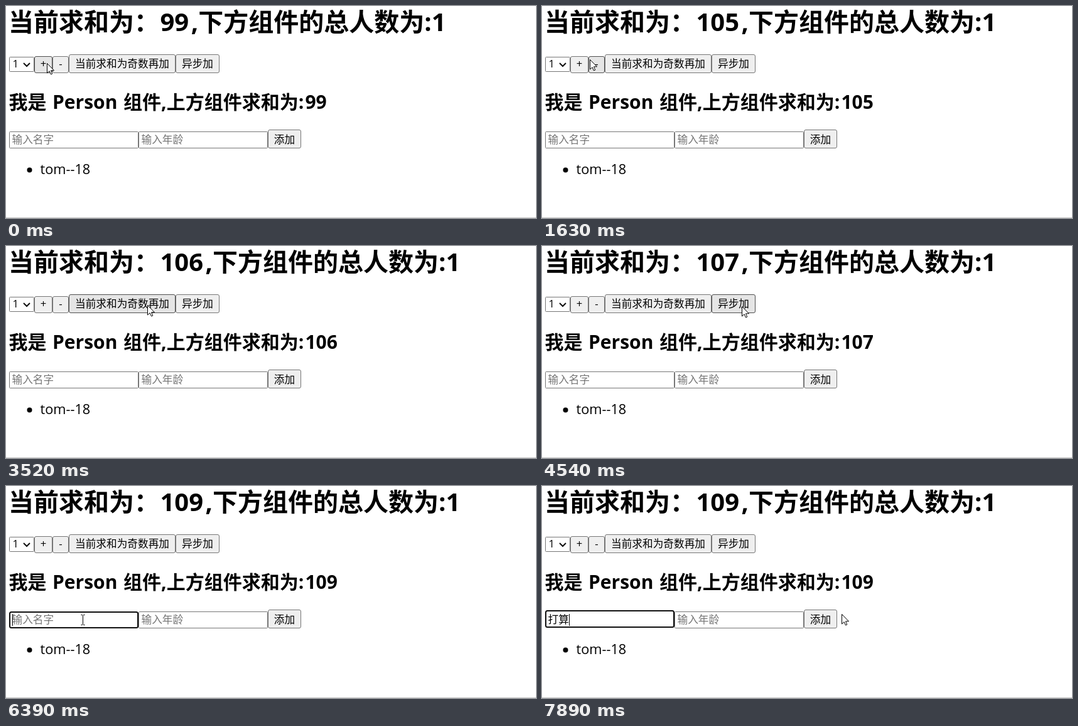
An HTML page with a canvas for the animation above (8000 ms loop, 844 px wide and 338 px high).

```html
<!DOCTYPE html>
<html lang="zh-CN">
<head>
<meta charset="utf-8">
<style>
  html, body { margin: 0; width: 100%; height: 100%; overflow: hidden; background: #fff; }
  canvas { display: block; }
</style>
</head>
<body>
<canvas id="stage" width="844" height="338"></canvas>
<script>
const ctx = document.getElementById('stage').getContext('2d');
const LOOP = 8000;
const FAMILY = '"Open Sans", "Noto Sans CJK SC", "Noto Sans CJK JP", sans-serif';
const UI_SIZE = 16.67;

// Each click: [time the sum changes, step, delay after mouse release]
const clicks = [
  [260, 1], [470, 1], [690, 1], [880, 1], [1080, 1], [1280, 1],
  [1850, -1], [2060, -1], [2270, -1],
  [2860, 1], [3060, 1], [3260, 1], [3450, 1],
  [4420, 1, 500], [4630, 1, 500], [4840, 1, 500]
];
const PRESS = 100;
const FOCUS = 5920;
const COMMIT = 7560;
const presses = clicks.map(([at, , delay = 0]) => [at - delay - PRESS, at - delay]);
presses.push([FOCUS, 6130]);

const pointerPath = [
  [0, 65, 91], [1450, 65, 91], [1650, 76, 85], [2420, 76, 85],
  [2720, 225, 94], [3600, 225, 94], [3850, 318, 96], [4720, 318, 96],
  [5030, 110, 93], [5230, 98, 102], [5800, 122, 213],
  [COMMIT, 122, 213], [7880, 477, 204]
];

const buttons = [
  { x: 45, y: 80, w: 29, h: 27, label: '+' },
  { x: 74, y: 80, w: 26, h: 27, label: '-' },
  { x: 100, y: 77, w: 170, h: 30, label: '当前求和为奇数再加' },
  { x: 270, y: 77, w: 70, h: 30, label: '异步加' },
  { x: 417, y: 197, w: 53, h: 30, label: '添加' }
];
const nameField = { x: 5, y: 200, w: 206, h: 27 };
const ageField = { x: 211, y: 200, w: 206, h: 27 };

// Input method: [start, typed letters, candidate list]
const typing = [
  [6900, 'd', ['的', '都', '到', '大', '打', '点', '当', '对', '但']],
  [7100, 'da', ['大', '打', '达', '答', '搭', '大家', '打开', '打算', '大小']],
  [7300, "da'suan", ['打算', '大蒜', '大算', '打', '大', '达', '答', '搭', '嗒']]
];

function pointerAt(t) {
  let i = 0;
  while (i < pointerPath.length - 2 && t >= pointerPath[i + 1][0]) i++;
  const [t0, x0, y0] = pointerPath[i], [t1, x1, y1] = pointerPath[i + 1];
  const k = Math.min(1, (t - t0) / (t1 - t0));
  const e = k * k * (3 - 2 * k);
  return { x: x0 + (x1 - x0) * e, y: y0 + (y1 - y0) * e };
}

const contains = (b, p) => p.x >= b.x && p.x < b.x + b.w && p.y >= b.y && p.y < b.y + b.h;

function text(str, x, y, size, { color = '#000', weight = 400, align = 'left' } = {}) {
  ctx.font = `${weight} ${size}px ${FAMILY}`;
  ctx.fillStyle = color;
  ctx.textAlign = align;
  ctx.fillText(str, x, y);
  return ctx.measureText(str).width;
}

function box({ x, y, w, h }, fill, stroke, radius, line = 1) {
  ctx.beginPath();
  ctx.roundRect(x + line / 2, y + line / 2, w - line, h - line, radius);
  ctx.fillStyle = fill;
  ctx.fill();
  ctx.lineWidth = line;
  ctx.strokeStyle = stroke;
  ctx.stroke();
}

function polyline(points, width, color) {
  ctx.beginPath();
  points.forEach(([x, y]) => ctx.lineTo(x, y));
  ctx.lineWidth = width;
  ctx.strokeStyle = color;
  ctx.stroke();
}

function drawButton(b, pointer, pressed) {
  const hover = contains(b, pointer);
  const [fill, stroke] = hover && pressed ? ['#f5f5f5', '#8d8d8d']
    : hover ? ['#e5e5e5', '#4f4f4f'] : ['#efefef', '#767676'];
  box(b, fill, stroke, 2.5);
  const baseline = b.y > 150 ? 219 : 98;
  text(b.label, b.x + b.w / 2, baseline, UI_SIZE, { align: 'center' });
}

function drawHeadings(sum) {
  const bold = { weight: 700 };
  text('当前求和为：', 4, 40, 40, bold);
  const w = text(String(sum), 245.5, 40, 40, bold);
  text(',下方组件的总人数为:1', 249 + w, 40, 40, bold);

  text('我是', 4.5, 164, 30, bold);
  text('Person', 74, 164, 30, bold);
  text('组件,上方组件求和为:', 187, 164, 30, bold);
  text(String(sum), 476.5, 164, 30, bold);
}

function drawSelect() {
  box({ x: 5, y: 81, w: 40, h: 24 }, '#fff', '#767676', 1);
  text('1', 10.5, 98, UI_SIZE);
  polyline([[28, 91], [33, 96], [38, 91]], 2, '#111');
}

function drawCandidates(list) {
  const left = 19, top = 232, h = 45;
  ctx.font = `400 20px ${FAMILY}`;
  const widths = list.map(word => ctx.measureText(word).width + 50);
  const total = widths.reduce((a, b) => a + b, 0) + 44;
  box({ x: left, y: top, w: total, h }, '#fff', '#c8c8c8', 1);
  let x = left + 14;
  list.forEach((word, i) => {
    const color = i ? '#000' : '#0067b8';
    text(String(i + 1), x, top + 29, 15, { color: i ? '#777' : color });
    text(word, x + 16, top + 30, 20, { color });
    x += widths[i];
  });
}

function drawFields(t) {
  const focused = t >= FOCUS, committed = t >= COMMIT;
  const active = committed ? null : typing.filter(([at]) => t >= at).pop();
  box(ageField, '#fff', '#767676', 1);
  text('输入年龄', 215.5, 219, UI_SIZE, { color: '#757575' });

  const field = committed ? { ...nameField, y: 198, h: 28 } : nameField;
  if (focused) box(field, '#fff', '#101010', 2.5, 2);
  else box(field, '#fff', '#767676', 1);

  const value = committed ? '打算' : active ? active[1] : '';
  let caret = 10;
  if (value) caret += text(value, 9.5, 219, UI_SIZE) + 0.5;
  else text('输入名字', 9.5, 219, UI_SIZE, { color: '#757575' });

  if (active) {
    ctx.setLineDash([2, 1]);
    polyline([[10, 222.5], [caret, 222.5]], 1, '#000');
    ctx.setLineDash([]);
  }
  const blinkOn = value || (t - FOCUS) % 1000 < 500;
  if (focused && blinkOn) {
    ctx.fillStyle = '#000';
    ctx.fillRect(Math.floor(caret), 204, 1, 19);
  }
  return active;
}

function drawPointer({ x, y }) {
  ctx.save();
  ctx.translate(Math.round(x) + 0.5, Math.round(y) + 0.5);
  if (contains(nameField, { x, y }) || contains(ageField, { x, y })) {
    polyline([[-3, -8], [-1, -8], [0, -7], [0, 7], [-1, 8], [-3, 8]], 1, '#000');
    polyline([[3, -8], [1, -8], [0, -7], [0, 7], [1, 8], [3, 8]], 1, '#000');
  } else {
    const arrow = new Path2D('M0 0V15.5L3.6 12.2L6 17.5L8.3 16.5L6 11.3H11Z');
    ctx.fillStyle = '#fff';
    ctx.fill(arrow);
    ctx.lineWidth = 1;
    ctx.strokeStyle = '#000';
    ctx.stroke(arrow);
  }
  ctx.restore();
}

function draw(t) {
  const pointer = pointerAt(t);
  const pressed = presses.some(([from, to]) => t >= from && t < to);
  const sum = clicks.reduce((n, [at, step]) => t >= at ? n + step : n, 99);

  ctx.fillStyle = '#fff';
  ctx.fillRect(0, 0, 844, 338);
  drawHeadings(sum);
  drawSelect();
  buttons.forEach(b => drawButton(b, pointer, pressed));
  const active = drawFields(t);

  ctx.beginPath();
  ctx.arc(37.5, 261.5, 4, 0, Math.PI * 2);
  ctx.fillStyle = '#000';
  ctx.fill();
  text('tom--18', 54.5, 268, 21.7);
  ctx.fillStyle = '#c8c8c8';
  ctx.fillRect(0, 337, 844, 1);

  if (active) drawCandidates(active[2]);
  if (pressed) {
    ctx.beginPath();
    ctx.arc(pointer.x, pointer.y - 1, 15, 0, Math.PI * 2);
    ctx.fillStyle = 'rgba(255, 250, 50, 0.6)';
    ctx.fill();
  }
  drawPointer(pointer);
}

function tick() {
  draw(performance.now() % LOOP);
  requestAnimationFrame(tick);
}
tick();
</script>
</body>
</html>
```
